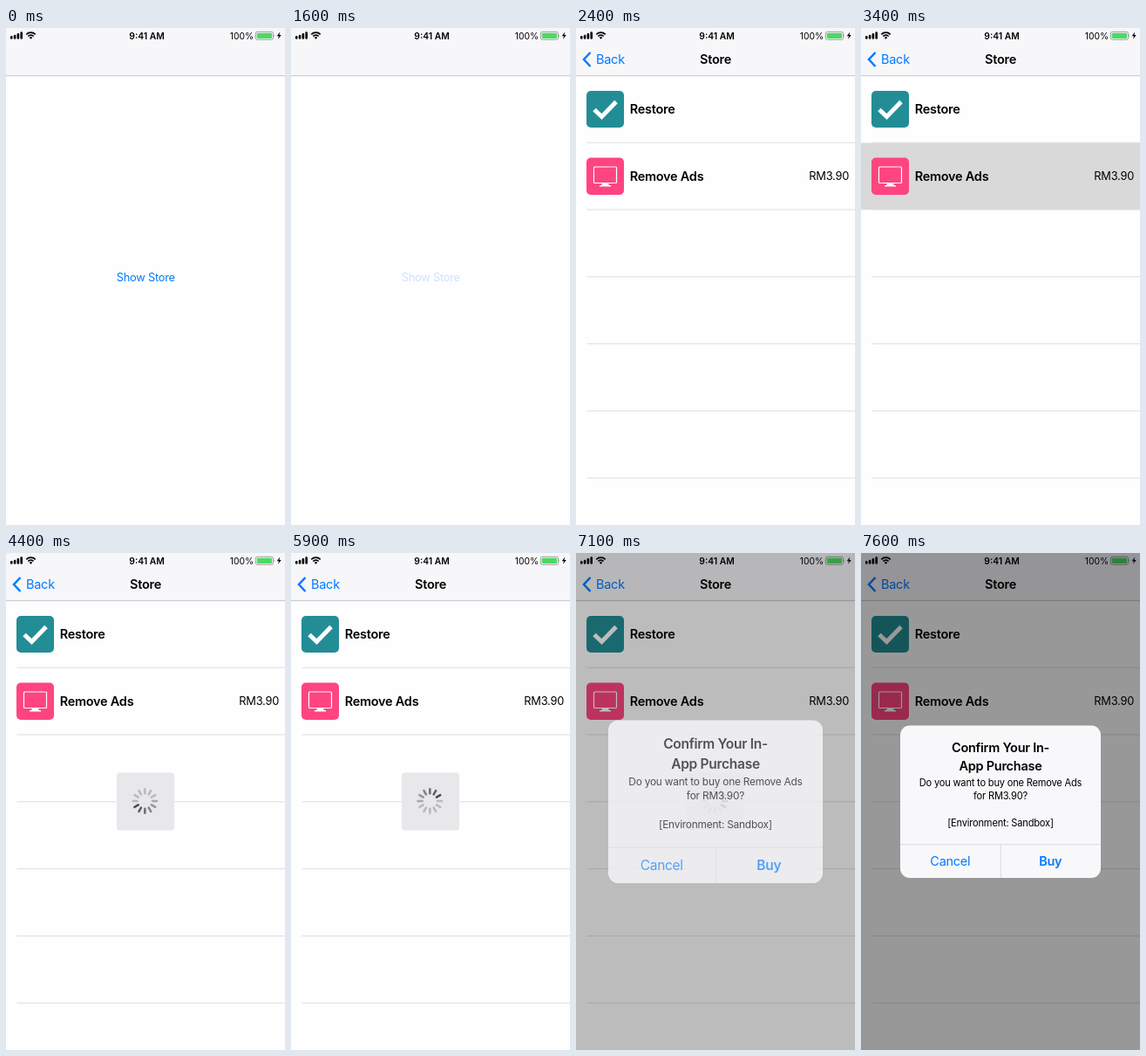
Recreate the animation shown at these times as an HTML page. Size 320x569 px, loop 8000 ms.

```html
<!DOCTYPE html>
<html lang="en">
<meta charset="utf-8">
<title>In-app store</title>
<style>
  html, body { margin: 0; height: 100%; overflow: hidden; background: #fefdff; }
  svg { display: block; width: 100%; height: 100%; }
  text { font: 12.8px Inter, sans-serif; letter-spacing: -.018em; }
  .mid { text-anchor: middle; }
  .end { text-anchor: end; }
  .head { font-size: 14.5px; font-weight: 600; }
  .large { font-size: 14.5px; }
  .small { font-size: 11.1px; }
  .status { font-size: 10.3px; letter-spacing: 0; }
  .tint { fill: #007aff; }
  .line { stroke: #dedde1; }
</style>
<svg viewBox="0 0 320 569">
  <g id="home">
    <rect width="320" height="569" fill="#fefdff"/>
    <text id="show" class="mid tint" x="160.3" y="289.5">Show Store</text>
  </g>
  <rect id="shade" width="320" height="569"/>

  <g id="store">
    <rect width="320" height="569" fill="#fefdff"/>
    <rect id="highlight" y="131.5" width="320" height="76.5" fill="#d9d9d9"/>
    <g id="lines" class="line"></g>
    <rect x="12" y="72" width="43" height="42" rx="5" fill="#238d96"/>
    <path d="M21 93.5l8.5 8L46 84.5" fill="none" stroke="#fff" stroke-width="5"/>
    <text class="head" x="61.7" y="98">Restore</text>
    <rect x="12" y="148.5" width="43" height="42.5" rx="5" fill="#ff4580"/>
    <rect x="20.5" y="159" width="26" height="18.5" rx="1" fill="none" stroke="#fff" stroke-width="1.2"/>
    <path d="M30 178h7l1 2h2v1.5H27V180h2z" fill="#fff"/>
    <text class="head" x="61.7" y="174.7">Remove Ads</text>
    <text class="end" x="313" y="173.7">RM3.90</text>
  </g>

  <rect width="320" height="54.5" fill="#f7f6f9"/>
  <path d="M0 54.7H320" stroke="#b7b6ba" stroke-width=".8"/>
  <path id="chevron" d="M16.5 28L9 36l7.500 8" fill="none" stroke="#007aff" stroke-width="2.5"/>
  <text id="back" class="large tint" x="23" y="41">Back</text>
  <text id="title" class="head mid" x="160" y="41">Store</text>

  <path d="M6.300 10.300v1.200M10.100 9v2.500M13.900 7.300v4.200M17.700 5.600v5.900" stroke="#000" stroke-width="2.600" stroke-linecap="round"/>
  <g fill="none" stroke="#000" stroke-width="1.700">
    <path d="M23.300 7.300a7.400 7.400 0 0 1 10.400 0M25.300 9.500a4.500 4.500 0 0 1 6.400 0"/>
    <path d="M26.800 10.900a2.400 2.400 0 0 1 3.400 0l-1.700 1.800z" fill="#000" stroke="none"/>
  </g>
  <text class="status mid" x="161.500" y="12.500" font-weight="600" style="font-weight:600">9:41 AM</text>
  <text class="status end" x="284" y="12.500">100%</text>
  <rect x="286.300" y="4.300" width="20.200" height="9" rx="2" fill="none" stroke="#8a8a8c" stroke-width=".8"/>
  <rect x="287.700" y="5.700" width="17.400" height="6.200" rx=".8" fill="#4cd964"/>
  <path d="M307.500 7.300q1.500 1.500 0 3z" fill="#8a8a8c"/>
  <path d="M314.300 4.500l-3.600 4.700h2.300l-1 3.600 3.700-4.900h-2.300z"/>

  <g id="loader">
    <rect x="127" y="251.500" width="66" height="66" rx="3.500" fill="#e8e7ea"/>
    <g id="spokes" stroke="#333" stroke-width="2.600" stroke-linecap="round"></g>
  </g>
  <rect id="dim" width="320" height="569"/>
  <g id="alert">
    <rect id="card" x="45" y="197.500" width="230" height="174.500" rx="11" fill="#f8f7fa"/>
    <g id="content">
      <path d="M45 333.700H275M160.300 333.700V372" stroke="#d3d2d6" stroke-width=".8"/>
      <text class="head mid" x="160" y="228.300">Confirm Your In-</text>
      <text class="head mid" x="160" y="249.300">App Purchase</text>
      <text class="small mid" x="160" y="267">Do you want to buy one Remove Ads</text>
      <text class="small mid" x="160" y="282">for RM3.90?</text>
      <text class="small mid" x="160" y="313">[Environment: Sandbox]</text>
      <text class="large mid tint" x="102.300" y="358.300">Cancel</text>
      <text class="head mid tint" x="217.300" y="358.300">Buy</text>
    </g>
  </g>
</svg>
<script>
const LOOP = 8000, PUSH = 1630, ALERT = 7000;
const el = Object.fromEntries([...document.querySelectorAll('[id]')].map(n => [n.id, n]));

const ramp = (t, from, to) => Math.min(1, Math.max(0, (t - from) / (to - from)));
// Critically damped spring from 0 to 1.
const spring = (ms, rate) => {
  const x = Math.max(0, ms) / 1000 * rate;
  return 1 - (1 + x) * Math.exp(-x);
};
const fade = (node, value) => node.setAttribute('opacity', value);
const move = (node, x) => node.setAttribute('transform', `translate(${x})`);

for (let i = 0; i < 6; i++)
  el.lines.innerHTML += `<path d="M12.500 ${131.2 + i * 76.8}H320"/>`;
for (let i = 0; i < 12; i++)
  el.spokes.innerHTML += `<path d="M0-8.800V-13.700" transform="translate(159.300 284) rotate(${i * 30})"/>`;

function draw(t) {
  const push = t > 2180 ? 1 : spring(t - PUSH, 16);
  fade(el.show, 1 - .8 * ramp(t, 1250, 1400) + .8 * ramp(t, 1700, 2000));
  move(el.home, -96 * push);
  fade(el.shade, .1 * push);
  move(el.store, 320 * (1 - push));
  fade(el.chevron, push);
  fade(el.back, push);
  move(el.back, 110 * (1 - push));
  fade(el.title, push);
  move(el.title, 150 * (1 - push));

  fade(el.highlight, t < 3400 ? 0 : 1 - ramp(t, 3600, 4000));
  fade(el.loader, ramp(t, 3600, 3850));
  const head = Math.floor(t * .012 + 3.5);
  [...el.spokes.children].forEach((spoke, i) => {
    const age = (head - i + 24) % 12;
    fade(spoke, Math.max(.25, .85 - age * .1));
  });

  const shown = spring(t - ALERT, 22);
  fade(el.dim, .4 * shown);
  fade(el.card, Math.sqrt(shown));
  fade(el.content, shown);
  el.alert.setAttribute('transform',
    `translate(160 284.700) scale(${1.2 - .2 * shown}) translate(-160 -284.700)`);
}

function tick() {
  draw(performance.now() % LOOP);
  requestAnimationFrame(tick);
}
tick();
</script>
</html>
```
